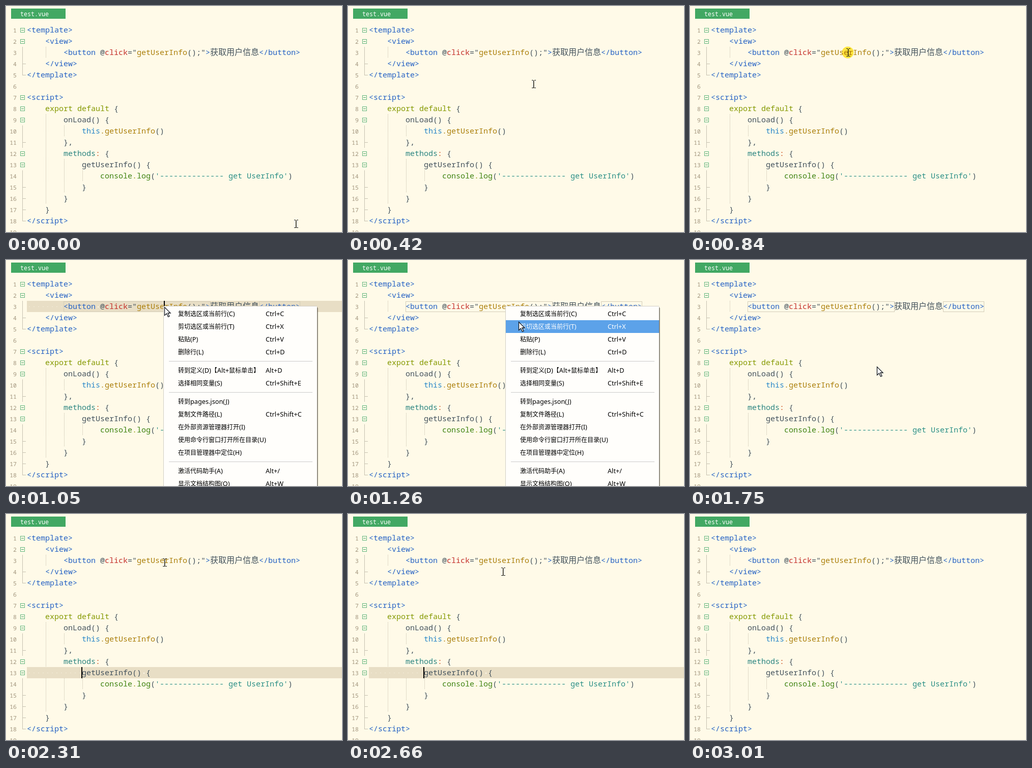
An HTML page with a canvas that plays this animation: 660x443 px, repeating every 3.08 s.

```html
<!DOCTYPE html>
<html lang="zh">
<head>
<meta charset="utf-8">
<style>
html, body { margin: 0; width: 100%; height: 100%; overflow: hidden; background: #fffae8; }
canvas { display: block; }
</style>
</head>
<body>
<canvas id="stage" width="660" height="443"></canvas>
<script>
const ctx = document.getElementById('stage').getContext('2d');
const LOOP = 3080, STEP = 70;
const LEFT = 41, CH = 9, LINE = 22;
const MONO = '"Noto Sans Mono", "DejaVu Sans Mono", monospace';
const CJK = '"Noto Sans CJK SC", "Noto Sans CJK", sans-serif';
const SANS = '"Noto Sans", "Open Sans", sans-serif';
const GREEN = '#42a863';

const INK = {
  b: '#2562c4', d: '#43525c', r: '#c42f2a', y: '#ab7f0b', o: '#859900',
  s: '#2a87c8', t: '#2b8580', c: '#cb4b16', g: '#3d8210', q: '#2a8f86'
};

// Each row: line number, indent column, then ink/text pairs
const CODE = [
  [1, 0, 'b', '<template>'],
  [2, 4, 'b', '<view>'],
  [3, 8, 'b', '<button ', 'd', '@', 'r', 'click', 'd', '="', 'y', 'getUserInfo',
    'd', '();"', 'b', '>', 'd', '获取用户信息', 'b', '</button>'],
  [4, 4, 'b', '</view>'],
  [5, 0, 'b', '</template>'],
  [7, 0, 'b', '<script>'],
  [8, 4, 'o', 'export default ', 'd', '{'],
  [9, 8, 'd', 'onLoad() {'],
  [10, 12, 's', 'this', 'y', '.getUserInfo', 'd', '()'],
  [11, 8, 'd', '},'],
  [12, 8, 't', 'methods', 'c', ':', 'd', ' {'],
  [13, 12, 'd', 'getUserInfo() {'],
  [14, 16, 'g', 'console', 'o', '.', 'g', 'log', 'd', '(', 'q', "'" + '-'.repeat(14) + " get UserInfo'", 'd', ')'],
  [15, 12, 'd', '}'],
  [16, 8, 'd', '}'],
  [17, 4, 'd', '}'],
  [18, 0, 'b', '<\/script>']
];
const FOLDS = [1, 2, 7, 8, 9, 12, 13];
// first row, last row, closing tick rows, corner at the end
const BRACKETS = [[3, 5, [4, 5], true], [10, 11, [11], false], [14, 18, [15, 16, 17, 18], true]];
// x, first row, last row
const GUIDES = [[78, 3, 3], [78, 9, 16], [114, 10, 10], [114, 13, 15], [150, 14, 14]];

const MENU = [
  [105, '复制选区或当前行(C)', 'Ctrl+C'],
  [130, '剪切选区或当前行(T)', 'Ctrl+X'],
  [155, '粘贴(P)', 'Ctrl+V'],
  [180, '删除行(L)', 'Ctrl+D'],
  [216, '转到定义(D)【Alt+鼠标单击】', 'Alt+D'],
  [241, '选择相同变量(S)', 'Ctrl+Shift+E'],
  [277, '转到pages.json(J)', ''],
  [302, '复制文件路径(L)', 'Ctrl+Shift+C'],
  [327, '在外部资源管理器打开(I)', ''],
  [352, '使用命令行窗口打开所在目录(U)', ''],
  [377, '在项目管理器中定位(H)', ''],
  [413, '激活代码助手(A)', 'Alt+/'],
  [438, '显示文档结构图(O)', 'Alt+W']
];

// Pointer path: time, x, y
const PATH = [
  [0, 570, 427], [140, 528, 372], [350, 400, 190], [490, 330, 115], [560, 319, 103],
  [700, 312, 90], [840, 311, 91], [1120, 311, 92], [1190, 320, 106], [1260, 335, 121],
  [1400, 358, 172], [1470, 364, 189], [1540, 366, 204], [1680, 367, 209], [1820, 367, 209],
  [2030, 348, 165], [2240, 314, 98], [2310, 312, 95], [2380, 311, 92], [2590, 311, 92],
  [2800, 292, 156], [2940, 270, 240], [3080, 260, 270]
];

const rowY = n => 47 + LINE * (n - 1);
const during = (t, a, b) => t >= a && t < b;

function box(x, y, w, h, color) {
  ctx.fillStyle = color;
  ctx.fillRect(x, y, w, h);
}

function frameBox(x, y, w, h, color) {
  ctx.strokeStyle = color;
  ctx.lineWidth = 1;
  ctx.strokeRect(x + .5, y + .5, w - 1, h - 1);
}

function label(text, x, y, font, color) {
  ctx.font = font;
  ctx.fillStyle = color;
  ctx.fillText(text, x, y);
}

function pointerAt(t) {
  let i = 1;
  while (i < PATH.length - 1 && PATH[i][0] < t) i++;
  const [t0, x0, y0] = PATH[i - 1], [t1, x1, y1] = PATH[i];
  const k = (t - t0) / (t1 - t0);
  return [Math.round(x0 + (x1 - x0) * k), Math.round(y0 + (y1 - y0) * k)];
}

function drawCurrentLine(n) {
  box(LEFT, rowY(n) - 11, 660 - LEFT, LINE, '#e8dec5');
  const row = CODE.find(r => r[0] === n);
  for (let c = 0; c < row[1]; c++) box(LEFT + c * CH + 4, rowY(n), 2, 1, '#f3ecd9');
  const gap = n === 13 ? 25 : 15;
  box(LEFT + gap * CH + 4, rowY(n), 2, 2, '#fffaf0');
}

function drawGutter() {
  ctx.textAlign = 'right';
  for (let n = 1; n <= 19; n++) {
    label(n, 21, rowY(n) + 5, '11.5px ' + MONO, '#a1947c');
  }
  ctx.textAlign = 'left';
  for (const n of FOLDS) {
    const y = rowY(n);
    frameBox(28, y - 4, 9, 9, '#62b67e');
    box(30, y, 5, 1, GREEN);
  }
  for (const [a, b, ticks, corner] of BRACKETS) {
    const top = rowY(a) - 11, end = corner ? rowY(b) + 1 : rowY(b) + 11;
    box(32, top, 1, end - top, '#c6c1b0');
    for (const n of ticks) box(32, rowY(n), 7, 1, '#c6c1b0');
  }
}

function drawGuides(current) {
  for (const [x, a, b] of GUIDES)
    for (let n = a; n <= b; n++) {
      if (n === current) continue;
      for (let y = rowY(n) - 11; y < rowY(n) + 11; y += 2) box(x, y, 1, 1, '#c2bca9');
    }
}

function drawCode() {
  for (const [n, col, ...parts] of CODE) {
    let x = LEFT + col * CH;
    for (let i = 0; i < parts.length; i += 2) {
      const text = parts[i + 1], wide = text.charCodeAt(0) > 255;
      label(text, x, rowY(n) + 5, wide ? '300 16px ' + CJK : '15px ' + MONO, INK[parts[i]]);
      x += text.length * (wide ? 16 : CH);
    }
  }
}

function drawTagBoxes() {
  frameBox(113, 81, 289, 21, '#d3cdb9');
  frameBox(497, 81, 81, 21, '#d3cdb9');
}

function mixedText(text, x, y, color) {
  for (const run of text.match(/[\x00-\xff]+|[^\x00-\xff]+/g) || []) {
    label(run, x, y, run.charCodeAt(0) > 255 ? '12px ' + CJK : '12.7px ' + SANS, color);
    x += ctx.measureText(run).width;
  }
}

function drawMenu(py) {
  box(312, 94, 301, 360, 'rgba(70,65,55,.45)');
  box(311, 92, 301, 360, 'rgba(70,65,55,.5)');
  box(309, 90, 302, 360, '#d2cfc6');
  box(310, 91, 301, 360, '#fffefb');
  for (const y of [198, 259, 395]) box(320, y, 282, 1, '#cbcbcb');
  for (const [y, name, keys] of MENU) {
    const hot = py >= y - 12 && py < y + 13;
    if (hot) box(310, y - 12, 301, 25, '#5ca2e9');
    const color = hot ? '#fff' : '#000';
    mixedText(name, 338, y + 5, color);
    mixedText(keys, 510, y + 5, color);
  }
}

function drawBeam(x, y) {
  const c = '#1c1c18';
  box(x - 1, y - 7, 1.5, 15, c);
  for (const dy of [-8, 7]) {
    box(x - 4, y + dy, 3, 1, c);
    box(x + 1, y + dy, 3, 1, c);
  }
}

function drawArrow(x, y) {
  const shape = [[0, 0], [0, 16], [4, 12.5], [7, 19], [9.5, 18], [6.5, 11.5], [11.5, 11.5]];
  ctx.beginPath();
  for (const [dx, dy] of shape) ctx.lineTo(x + dx + .5, y + dy + .5);
  ctx.closePath();
  ctx.fillStyle = '#fff';
  ctx.fill();
  ctx.strokeStyle = '#14181f';
  ctx.lineWidth = 1.3;
  ctx.stroke();
}

function drawClick(x, y) {
  ctx.globalCompositeOperation = 'multiply';
  ctx.fillStyle = '#ffea45';
  ctx.beginPath();
  ctx.arc(x - 1, y, 11.5, 0, Math.PI * 2);
  ctx.fill();
  ctx.globalCompositeOperation = 'source-over';
}

function draw(t) {
  const [px, py] = pointerAt(t);
  const menu = during(t, 1050, 1750);
  const tags = during(t, 910, 1820) || during(t, 2520, 2590);
  const onRow3 = during(t, 910, 1190) || during(t, 2520, 2590);
  const onRow13 = during(t, 1820, 3010) && !onRow3;
  const current = onRow3 ? 3 : onRow13 ? 13 : 0;

  box(0, 0, 660, 443, '#fffae8');
  box(10, 5, 107, 20, GREEN);
  label('test.vue', 28, 20, '11.7px ' + MONO, '#fff');

  if (current) drawCurrentLine(current);
  drawGuides(current);
  drawGutter();
  if (tags) drawTagBoxes();
  drawCode();
  if (onRow3) box(310, 80, 2, LINE, '#000');
  if (onRow13) box(148, 300, 2, LINE, '#000');

  if (menu) drawMenu(py);
  if (during(t, 770, 910) || during(t, 2450, 2590)) drawClick(px, py);
  if (t >= 3010) return;
  if (during(t, 1050, 1820)) drawArrow(px, py);
  else drawBeam(px, py);
}

const start = performance.now();
function tick() {
  const t = (performance.now() - start) % LOOP;
  draw(Math.floor(t / STEP) * STEP);
  requestAnimationFrame(tick);
}
tick();
</script>
</body>
</html>
```
